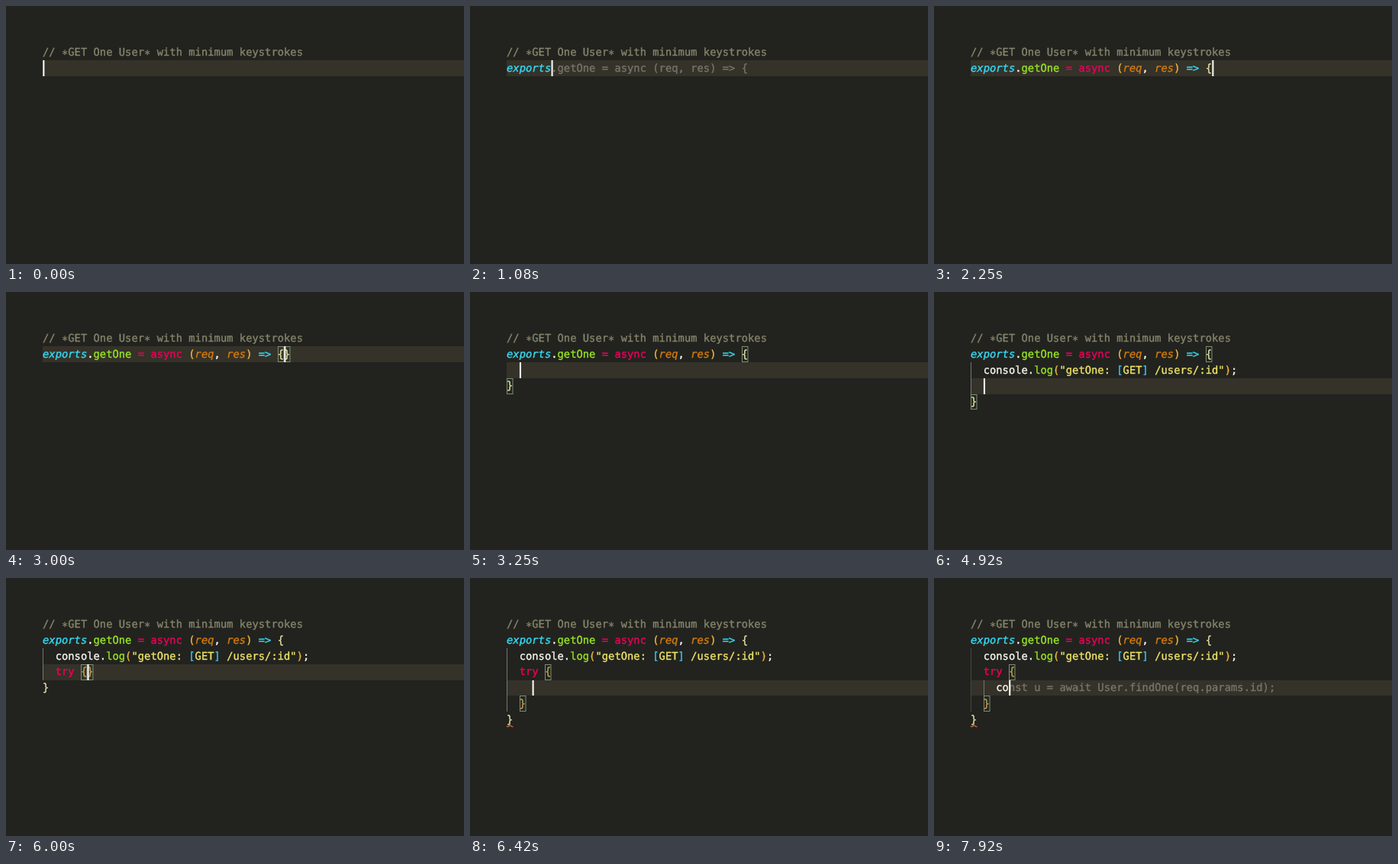
These frames come from a looping animation (600x338 px, 8 s). An HTML page with a canvas:

```html
<!DOCTYPE html>
<html lang="en">
<head>
<meta charset="utf-8">
<title>Code completion</title>
<style>
  html, body { margin: 0; width: 100%; height: 100%; overflow: hidden; background: #22231e; }
  canvas { display: block; }
</style>
</head>
<body>
<canvas id="stage" width="600" height="338"></canvas>
<script>
const ctx = document.getElementById('stage').getContext('2d');
const LOOP = 8000, LEFT = 48, CHAR = 8.317, LINE = 20.75, TOP = 50.5, BASE = 65.2;
const FONT = '13.81px "DejaVu Sans Mono", monospace';
const COLOR = {
  back: '#22231e', active: '#353229', comment: '#85846c', ghost: '#77756e', plain: '#f8f8f2',
  cyan: '#35dcf8', green: '#98e622', pink: '#e8045a', param: '#d27c10', paren: '#f3b63c',
  string: '#f0e56a', bracket: '#3cc8fa', braces: ['#e8e2aa', '#cf9a5a'],
  frame: '#7f8a7c', match: 'rgba(0, 100, 0, .1)', guide: '#46473f', guideOn: '#767771', error: '#e06a4c'
};

const COMMENT = '// *GET One User* with minimum keystrokes';
const HEAD = 'exports.getOne = async (req, res) => {';
const LOG = 'console.log("getOne: [GET] /users/:id");';
const QUERY = 'const u = await User.findOne(req.params.id);';

// In each state | is the cursor, ¦ the cursor before a suggestion, ^ an error mark on the last line.
const body = s => `${HEAD}\n  ${s}\n}`;
const next = s => body(`${LOG}\n  ${s}`);
const inTry = s => next(`try {\n    ${s}\n  }`);
const suggest = (s, n) => s.slice(0, n) + '¦' + s.slice(n);
const states = [
  [0, '|'], [330, 'e|'], [420, 'exp|'], [500, 'expo|'], [580, 'expor|'], [670, 'exports|'],
  [750, suggest(HEAD, 7)], [2250, HEAD + '|'], [2670, HEAD + '|}'],
  [3250, body('|')], [4000, body('c|')], [4080, body('co|')], [4160, body(suggest(LOG, 2))],
  [4580, body(LOG + '|')], [4830, next('|')],
  [5080, next('t|')], [5170, next('tr|')], [5330, next('try|')], [5500, next('try |')],
  [5830, next('try {|}')], [6080, inTry('|')], [6330, inTry('|') + '^'],
  [6920, inTry('c|') + '^'], [7080, inTry('co|') + '^'], [7250, inTry(suggest(QUERY, 2)) + '^']
];

const TOKEN = /(?<cyanItalic>exports)|(?<green>getOne(?= =)|log)|(?<cyan>=>)|(?<pink>async|try|=)|(?<paramItalic>req|res)|(?<paren>[()])|(?<string>".*?(?=\[)|GET(?=\])| \/.*")|(?<bracket>[[\]])|(?<brace>[{}])/g;

const colX = c => LEFT + c * CHAR;
const rowY = r => Math.round(TOP + r * LINE);

function text(s, row, col, color, italic) {
  ctx.font = (italic ? 'italic ' : '') + FONT;
  ctx.fillStyle = ctx.strokeStyle = color;
  // A hairline outline gives the letters their slightly heavy weight.
  ctx.lineWidth = .35;
  [...s].forEach((ch, i) => {
    // The asterisk sits on the middle of the line.
    const x = colX(col + i), y = BASE + row * LINE + (ch === '*' ? 2.6 : 0);
    ctx.fillText(ch, x, y);
    ctx.strokeText(ch, x, y);
  });
}

function rect(x, y, w, h, color) {
  ctx.fillStyle = color;
  ctx.fillRect(x, y, w, h);
}

function bracketBox(row, col) {
  const x = Math.round(colX(col)), y = rowY(row), height = rowY(row + 1) - y;
  rect(x, y, 8.5, height, COLOR.match);
  ctx.strokeStyle = COLOR.frame;
  ctx.lineWidth = 1;
  ctx.strokeRect(x + .5, y + .5, 7.5, height - 1);
}

function squiggle(row) {
  const y = rowY(row + 1) - 2;
  ctx.beginPath();
  for (let x = 0; x <= 8.5; x += .5) ctx.lineTo(LEFT + x, y + Math.sin(x * Math.PI / 3));
  ctx.strokeStyle = COLOR.error;
  ctx.lineWidth = 1.1;
  ctx.stroke();
}

function findPairs(lines) {
  const open = [], pairs = [];
  lines.forEach((line, row) => [...line].forEach((ch, col) => {
    if (ch === '{') open.push({ row, col });
    if (ch === '}') pairs.push({ from: open.pop(), to: { row, col } });
  }));
  return pairs;
}

function highlight(lines) {
  let depth = 0;
  lines.forEach((line, row) => {
    let end = 0;
    for (const m of line.matchAll(TOKEN)) {
      text(line.slice(end, m.index), row, end, COLOR.plain);
      const kind = Object.keys(m.groups).find(k => m.groups[k]);
      const color = kind === 'brace'
        ? COLOR.braces[m[0] === '{' ? depth++ : --depth]
        : COLOR[kind.replace('Italic', '')];
      text(m[0], row, m.index, color, kind.endsWith('Italic'));
      end = m.index + m[0].length;
    }
    text(line.slice(end), row, end, COLOR.plain);
  });
}

function draw(state) {
  // The empty first line leaves room for the comment.
  const lines = ['', ...state.replace('^', '').split('\n')];
  const row = lines.findIndex(l => /[|¦]/.test(l));
  const col = lines[row].search(/[|¦]/);
  const rest = lines[row].slice(col + 1);
  const ghost = lines[row][col] === '¦' ? rest : '';
  lines[row] = lines[row].slice(0, col) + (ghost ? '' : rest);

  rect(0, 0, 600, 338, COLOR.back);
  const top = rowY(row), height = rowY(row + 1) - top;
  rect(LEFT, top, 600 - LEFT, height, COLOR.active);

  const pairs = findPairs(lines);
  const encloses = ({ from, to }) =>
    (from.row < row || from.row === row && from.col < col) &&
    (to.row > row || to.row === row && to.col >= col);
  const guides = pairs.filter(p => lines.slice(p.from.row + 1, p.to.row).some(l => l.trim()));
  const current = guides.find(encloses);
  for (const p of guides) {
    const y = rowY(p.from.row + 1);
    rect(Math.round(colX(p.to.col)), y, 1, rowY(p.to.row) - y, p === current ? COLOR.guideOn : COLOR.guide);
  }
  const match = pairs.find(encloses);
  if (match) [match.from, match.to].forEach(b => bracketBox(b.row, b.col));

  text(COMMENT, 0, 0, COLOR.comment);
  highlight(lines);
  text(ghost, row, col, COLOR.ghost);
  if (state.endsWith('^')) squiggle(lines.length - 1);
  rect(colX(col) + .3, top, 2.1, height, COLOR.plain);
}

ctx.textRendering = 'geometricPrecision';
const start = performance.now();
function tick() {
  const t = (performance.now() - start) % LOOP;
  draw(states.findLast(s => s[0] <= t)[1]);
  requestAnimationFrame(tick);
}
tick();
</script>
</body>
</html>
```
